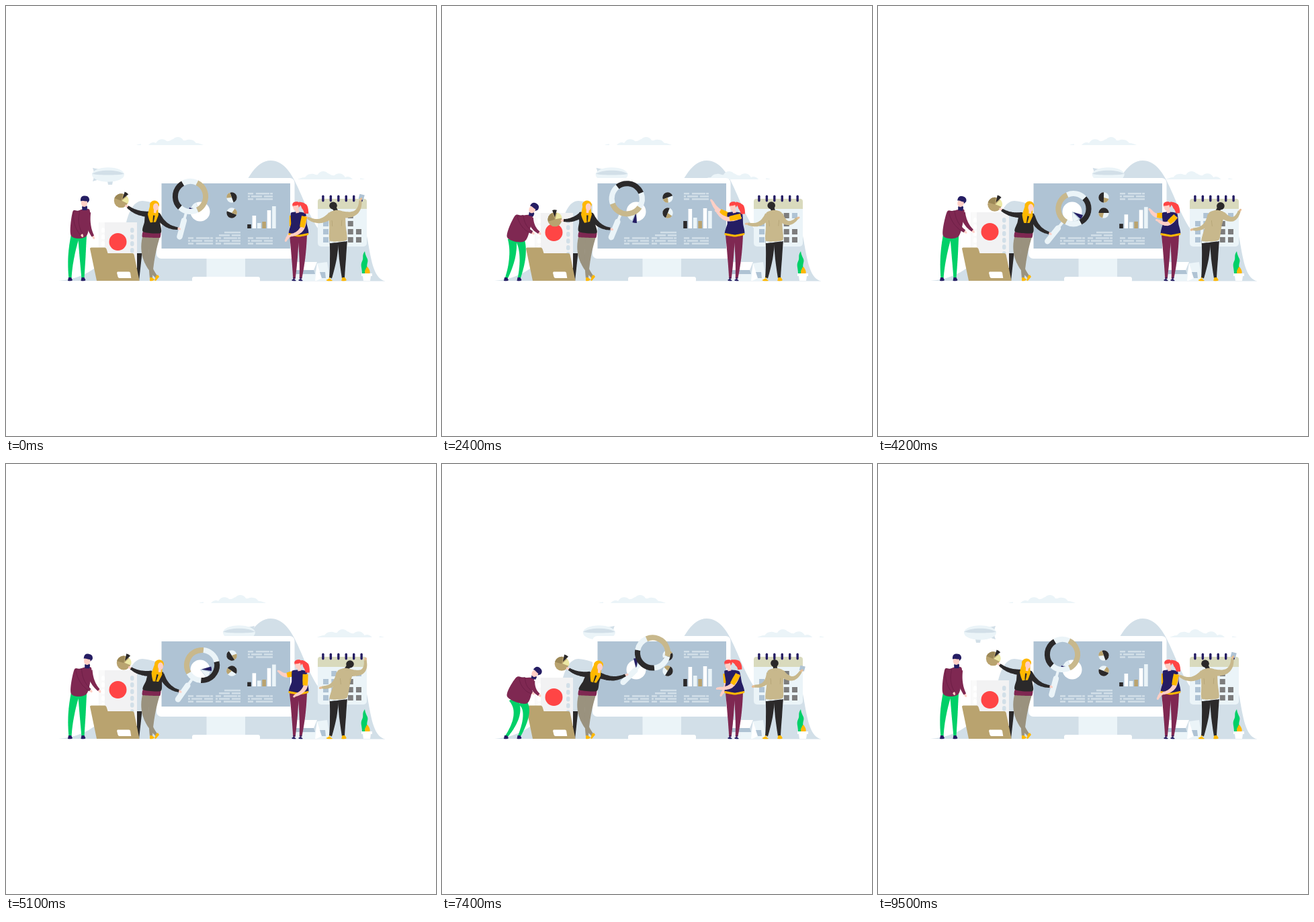
An HTML page with a canvas that plays this animation: 640x640 px, repeating every 9.6 s.

```html
<!DOCTYPE html>
<html lang="en">
<head>
<meta charset="utf-8">
<title>Team at work</title>
<style>
html, body { margin: 0; width: 100%; height: 100%; overflow: hidden; background: #fff; }
canvas { display: block; width: 640px; height: 640px; }
</style>
</head>
<body>
<canvas id="stage" width="640" height="640"></canvas>
<script>
const ctx = document.getElementById("stage").getContext("2d");
const LOOP = 9600, CYCLE = 9500;
const KEYS = [0, 1600, 3300, 5100, 6200, 7400, CYCLE];
const C = {
  hill: "#d2dfe8", pale: "#ebf4f8", screen: "#afc3d4", white: "#fff", dark: "#2b292a",
  navy: "#251d63", wine: "#7f2852", wineDark: "#621c40", green: "#00d068", tan: "#b9a36f",
  sand: "#c8b88c", taupe: "#9a927e", amber: "#ffb800", red: "#ff4545", skin: "#ffcfc5",
  skinTan: "#e6bd95", grey: "#7d7d7d", film: "#f2f2f3", cream: "#ece8a4", header: "#d9dabd"
};
let now = 0;

// Smooth cyclic path through one value per key time.
function track(...v) {
  let i = 0;
  while (i < 5 && now >= KEYS[i + 1]) i++;
  const span = k => KEYS[k + 1] - KEYS[k];
  const slope = k => { k = (k + 6) % 6; return (v[(k + 1) % 6] - v[k]) / span(k); };
  const tangent = k => {
    const a = slope(k - 1), b = slope(k);
    return a * b <= 0 ? 0 : 2 * a * b / (a + b);
  };
  const h = span(i), u = (now - KEYS[i]) / h, w = 1 - u;
  return v[i] * w * w * (1 + 2 * u) + v[(i + 1) % 6] * u * u * (3 - 2 * u)
    + h * u * w * (w * tangent(i) - u * tangent(i + 1));
}
const smooth = u => u * u * (3 - 2 * u);
const rad = d => d * Math.PI / 180;
const shift = (p, x, y) => [p[0] + x, p[1] + y];
const mix = (a, b, k) => [a[0] + (b[0] - a[0]) * k, a[1] + (b[1] - a[1]) * k];
const polar = (p, r, deg) => shift(p, r * Math.cos(rad(deg)), r * Math.sin(rad(deg)));
const heading = (a, b) => Math.atan2(b[1] - a[1], b[0] - a[0]) * 180 / Math.PI;
const elbowOf = (a, b, bend) => polar(mix(a, b, 0.5), bend, heading(a, b) + 90);

function fill(color, build) {
  ctx.beginPath();
  build();
  ctx.fillStyle = color;
  ctx.fill();
}
const rect = (color, x, y, w, h, r = 0) => fill(color, () => ctx.roundRect(x, y, w, h, r));
const oval = (color, x, y, rx, ry = rx, turn = 0) => fill(color, () => ctx.ellipse(x, y, rx, ry, rad(turn), 0, 7));
const path = (color, d) => { ctx.fillStyle = color; ctx.fill(new Path2D(d)); };

// Closed shape through points; k = 0 gives straight sides.
function shape(color, pts, k = 0.12) {
  const n = pts.length, p = i => pts[(i + n) % n];
  fill(color, () => {
    ctx.moveTo(...pts[0]);
    for (let i = 0; i < n; i++) {
      const a = p(i - 1), b = p(i), c = p(i + 1), d = p(i + 2);
      ctx.bezierCurveTo(b[0] + (c[0] - a[0]) * k, b[1] + (c[1] - a[1]) * k,
        c[0] - (d[0] - b[0]) * k, c[1] - (d[1] - b[1]) * k, c[0], c[1]);
    }
  });
}

// Tapered bent limb from a through b to c.
function limb(color, a, b, c, w0, w1, w2, edge) {
  const m = [2 * b[0] - (a[0] + c[0]) / 2, 2 * b[1] - (a[1] + c[1]) / 2];
  const left = [], right = [];
  for (let i = 0; i <= 16; i++) {
    const u = i / 16, q = mix(mix(a, m, u), mix(m, c, u), u);
    const side = heading(mix(a, m, u), mix(m, c, u)) + 90;
    const r = (u < 0.5 ? w0 + (w1 - w0) * 2 * u : w1 + (w2 - w1) * (2 * u - 1)) / 2;
    left.push(polar(q, r, side));
    right.unshift(polar(q, -r, side));
  }
  shape(color, left.concat(right), 0);
  if (edge) {
    ctx.strokeStyle = edge;
    ctx.lineWidth = 0.6;
    ctx.stroke();
  }
}
function arm(sleeve, skin, shoulder, hand, bend, width = 8.5, edge) {
  const elbow = elbowOf(shoulder, hand, bend);
  oval(skin, ...hand, 3.2, 1.7, heading(elbow, hand));
  limb(sleeve, shoulder, elbow, mix(elbow, hand, 0.92), width, 6.5, 4, edge);
}
function wedge(color, c, r, from, to, pull = 0) {
  const [x, y] = polar(c, pull, (from + to) / 2);
  fill(color, () => { ctx.moveTo(x, y); ctx.arc(x, y, r, rad(from), rad(to)); });
}
function placed(x, y, turn, draw, sx = 1) {
  ctx.save();
  ctx.translate(x, y);
  ctx.rotate(rad(turn));
  ctx.scale(sx, 1);
  draw();
  ctx.restore();
}
function shoe(color, x, dir) {
  path(color, `M${x - 2} 404H${x + 2}L${x + 4 * dir} 408Q${x + 3 * dir} 410 ${x - 3 * dir} 409Z`);
}

function cloud(x, base, dir) {
  placed(x, base, 0, () => {
    path(C.pale, "M0 0C3 -4 8 -5 11 -3C15 -10 23 -10 27 -6C32 -5 33 -8 37 -9C42 -14 49 -12 52 -7C56 -6 57 -9 62 -8C67 -8 69 -5 71 -3C76 -3 79 -1 82 0Z");
    path(C.pale, "M-18 0Q-15 -2 -11 -1.5V0Z");
  }, dir);
}
function airship(x, dir) {
  placed(x, 251, 0, () => {
    path(C.hill, "M-23 -10L-13 -8L-16 -4H-21ZM-23 10L-13 7L-17 3L-21 4ZM-1 10H7L6 15H0Z");
    oval(C.pale, 0, 0, 24, 10.8);
    path(C.hill, "M-24 -1C-14 -8 14 -8 24 -1C12 1 -12 1 -24 -1Z");
  }, dir);
}
function lowCloudX() {
  if (now < 2700) return 470.5 + 45.5 * (1 - now / 2700) ** 2;
  if (now < 5900) return 470.5 + 88 * smooth((now - 2700) / 3200);
  return 558.5 - 42.5 * ((now - 5900) / 3600) ** 2;
}
function landscape() {
  path(C.hill, "M78 409C132 406 166 365 179 322C184 302 192 290 203 290C252 293 280 350 300 350C340 340 350 230 394 230C430 231 437 290 465 332L510 300C549 305 531 403 565 409.5Z");
  const drift = smooth(1 - Math.abs(2 * now / CYCLE - 1));
  cloud(212 + 94.5 * drift, 207, 1);
  cloud(lowCloudX(), 258, -1);
  airship(152 + 198 * drift, now < CYCLE / 2 ? 1 : -1);
}

function textBlock(x, y) {
  [[0, 8, 12, 32, 33, 37], [0, 3, 5, 21, 24, 37], [0, 8, 12, 37]].forEach((row, i) => {
    for (let k = 0; k < row.length; k += 2) rect(C.hill, x + row[k], y + i * 4.1, row[k + 1] - row[k], 2.5);
  });
}
function smallPie(y, turn) {
  oval(C.pale, 336, y, 7.7);
  wedge(C.dark, [336, y], 7.7, turn - 90, turn + 90);
  wedge(C.tan, [336, y], 7.7, turn - 165, turn - 90);
}
function monitor(spin) {
  rect(C.pale, 298.5, 375, 57.5, 29);
  rect(C.white, 277, 403, 101, 8, 3);
  rect(C.white, 224, 256, 205.5, 120, 7);
  rect(C.screen, 231.5, 264, 191.5, 97);
  textBlock(360, 278);
  for (const x of [271, 312, 360]) textBlock(x, 344.2);
  rect(C.hill, 325, 335.8, 24, 2.5);
  rect(C.hill, 317, 340, 16, 2.5);
  rect(C.hill, 336, 340, 13, 2.5);

  smallPie(285, -20 - spin);
  smallPie(308, 110 + spin);
  const disc = [289, 306], a = 190 - spin;
  oval(C.white, ...disc, 14.5);
  wedge(C.screen, disc, 14.6, a - 14, a + 55);
  wedge(C.pale, disc, 14, a + 15, a + 55, 1);
  wedge(C.navy, disc, 15, a - 14, a + 12, 2);

  // Bars rise and fall twice per cycle.
  const beat = Math.min(1, 0.67 * (1 - Math.cos(rad(2 * spin))));
  [[C.dark, 6, 5], [C.white, 19, 10], [C.pale, 8, 8], [C.tan, 10, 1], [C.white, 27, 3], [C.pale, 33, -7]]
    .forEach(([color, height, rise], i) => {
      const h = height + rise * beat;
      rect(color, 359.2 + i * 7.38, 331 - h, 5.6, h);
    });
}

function calendar(holding) {
  rect(C.pale, 464, 288, 73, 70, 5);
  rect(C.header, 464, 287, 73, 15, [4, 4, 0, 0]);
  for (let i = 0; i < 6; i++) rect(C.navy, 470.2 + i * 11.45, 281.5, 3.4, 10, 1.7);
  for (let row = 0; row < 4; row++) {
    for (const col of [0, 1, 3, 4]) {
      const note = col === 4 && row === 0;
      if (row + col === 0 || (col === 4 && row === 1) || (note && holding)) continue;
      rect(col < 3 || note ? C.screen : C.grey, 472 + col * 12.25, 308 + row * 12, 8, 8);
    }
  }
}

function boxAndPlant() {
  path(C.white, "M433 381H463L458 393H432Z");
  path(C.screen, "M432 393H458L460 399H432Z");
  path(C.pale, "M430 399H460L463 383L478 381L483 409H430Z");
  path(C.white, "M463 383L470 405L462 409H460Z");
  path(C.screen, "M467 396H475L476 405H470Z");
  path(C.green, "M534 365C529 372 533 374 530 380C527 386 530 390 530 398H538C539 391 536 389 538 382C540 376 535 374 534 365Z");
  path(C.amber, "M538 388C535 390 536 392 534 394V399H541C543 395 540 391 538 388Z");
  path(C.white, "M529 398H545V402H543L542 409H532L531 402H529Z");
}

function filmAndFolder() {
  path(C.dark, "M150 368H202.5L198 409H150Z");
  const top = track(322, 310, 307, 307, 307, 318);
  rect(C.film, 138, top, 57, 390 - top);
  rect("#fafafa", 138.5, top, 8.5, 390 - top);
  for (let y = top + 8; y < top + 60; y += 10) {
    rect(C.white, 142, y, 5, 7.5, 2.5);
    rect(C.hill, 185, y, 5.5, 7.5, 2.7);
  }
  oval(C.red, 166.5, top + 29, 13);
  path(C.tan, "M125 361Q125 359.5 127 359.5H147Q149 359.5 150 363L151.5 368H188Q190 368 190.6 370L198.6 409H135Z");
  path(C.white, "M166 395.5H183Q184.5 395.5 185 397L186.3 405H169Q167 405 166.5 403L165 397Z");
}

function bendingMan() {
  const lean = track(0, 1, 0.5, 0.2, 0.5, 1);
  const crouch = lean ** 3, reach = 1 - (1 - lean) ** 4, lift = Math.sin(Math.PI * lean);
  const neck = [117 + 19 * lean, 302 + 16 * crouch];
  const chest = [125 + 12 * lean, 306 + 16 * crouch];
  const back = [99 + 11 * lean, 307 + 11 * crouch];
  const hipL = [97, 342 + 4 * crouch], hipR = [120 + 7 * crouch, 342 + 14 * crouch];
  limb(C.green, mix(hipL, hipR, 0.27), [97 + 14 * crouch, 374], [95.5, 406], 13, 9, 4);
  limb(C.green, mix(hipL, hipR, 0.72), [114 + 11 * crouch, 373], [114.5, 406], 13, 9, 4);
  shoe(C.navy, 95, 1);
  shoe(C.navy, 114.5, 1);

  arm(C.wine, C.skin, shift(chest, -3, 1), [130 + 15 * reach, 344 - 11 * lift], 3);
  shape(C.wine, [neck, chest, hipR, hipL, back, mix(back, neck, 0.45)], 0.15);
  arm(C.wine, C.skin, mix(back, neck, 0.35), [113 + 22 * reach, 341 - 6 * lift], 4, 9, C.wineDark);

  const head = [117.5 + 25 * lean, 288 + 20 * crouch];
  limb(C.navy, mix(head, neck, 0.6), mix(head, neck, 0.8), shift(neck, 0, 2), 5, 8, 7);
  placed(...head, 38 * lean, () => {
    oval(C.skin, -1, 5, 4.8, 6);
    path(C.navy, "M-6.5 2.5C-7 -4 -4 -5.5 0 -5.5C5 -5.5 7 -2 6.5 1.5L4 5L3 2.5C0 3 -4 1 -6.5 2.5Z");
  });
}

function heldPie(c, a) {
  oval(C.tan, ...c, 10.5);
  wedge("#9c8857", c, 10.5, a - 105, a - 20);
  wedge(C.cream, c, 10.2, a + 16, a + 82, 1);
  wedge(C.dark, c, 11, a - 18, a + 18, 3.5);
}
function magnifier(c, angle, spin) {
  const stroke = (color, width, cap, build) => {
    ctx.strokeStyle = color;
    ctx.lineWidth = width;
    ctx.lineCap = cap;
    ctx.beginPath();
    build();
    ctx.stroke();
  };
  const bar = (from, to) => () => { ctx.moveTo(...polar(c, from, angle)); ctx.lineTo(...polar(c, to, angle)); };
  stroke(C.pale, 4, "butt", bar(25, 36));
  stroke(C.pale, 8.5, "round", bar(37, 62));
  let a = angle + 28 + spin;
  for (const [color, size] of [[C.dark, 107], [C.pale, 56], [C.sand, 127], [C.pale, 70]]) {
    stroke(color, 8, "butt", () => ctx.arc(...c, 22.6, rad(a), rad(a + size)));
    a += size;
  }
}

function blondeWoman(spin) {
  const lens = [track(274.5, 264, 289.5, 291.5, 281.5, 313.5), track(283.5, 273.5, 302.5, 299.5, 273, 281)];
  const angle = track(105, 97, 130, 125, 102, 135);
  const lean = track(0, -8, 0, 7, 2, 12);
  const lowered = track(0, 1, 0.1, 0.1, 1, 0.1);
  magnifier(lens, angle, spin);

  const drop = Math.max(0, lean) * 0.25;
  const head = [222 + lean, 299 + drop];
  const shL = [208 + 0.7 * lean, 307 + drop], shR = [229 + 0.75 * lean, 308.5 + drop];
  const hairEnd = [219 + 0.55 * lean, 322 + drop];
  const handL = [180 + 0.6 * lean + 5 * lowered, 298 + 36 * lowered + drop];
  const armL = shift(shL, 4, 3);

  limb(C.taupe, [210.5, 343], [208.5, 374], [224.5, 404], 14, 10, 4);
  limb(C.taupe, [221.5, 343], [217, 373], [216, 405], 15, 9.5, 4);
  path(C.amber, "M214 404H217L221 407Q219 410 214 409ZM223 402L226 400L228 403L223 409Q220 409 222 406Z");
  shape(C.wine, [[204, 336], [230, 336], [229, 345], [203, 344]], 0.04);

  const tilt = heading(elbowOf(armL, handL, -3), handL) + 13;
  heldPie(polar(handL, 12, tilt), tilt + 82);
  arm(C.dark, C.skin, armL, handL, -3);
  arm(C.dark, C.skin, shift(shR, -3, 3), polar(lens, 51, angle + 5), 5);
  const hipL = [204, 336], hipR = [230, 338];
  shape(C.dark, [shL, mix(shL, shR, 0.5), shR, mix(shR, hipR, 0.5), hipR, hipL, mix(shL, hipL, 0.5)]);

  const hairMid = shift(mix(head, hairEnd, 0.5), -1.5, 0);
  limb(C.amber, shift(head, -1, -5), hairMid, hairEnd, 11, 16, 8);
  oval(C.amber, head[0] - 1, head[1] - 3, 7, 6.5);
  limb(C.dark, mix(head, hairEnd, 0.55), mix(head, hairEnd, 0.8), hairEnd, 2.5, 2, 1);
  limb(C.skin, head, shift(head, 0, 5), shift(head, -0.5, 9), 5, 4, 3.5);
  oval(C.skin, head[0] + 1, head[1], 4, 5.6);
}

function redhead() {
  const lean = track(0, 6, -4, 3, 8, -6);
  const raise = track(0, 1, 0.87, 0.65, 0.78, 0.08);
  const near = [track(423, 410, 408, 430, 445, 411), track(342, 318, 297, 345, 351, 334)];
  const head = [432 + lean, 298];
  const shL = [424 + 0.6 * lean, 308], shR = [446 + 0.55 * lean, 309];
  const tail = [447 + 0.6 * lean, 309 + 0.5 * lean];

  limb(C.wine, [429, 341], [429.5, 374], [429, 406], 14, 9, 3.5);
  limb(C.wine, [441, 341], [441, 374], [438.5, 406], 14, 9, 3.5);
  shoe(C.navy, 429, -1);
  shoe(C.navy, 439, -1);
  const bareArm = (shoulder, hand, bend) => {
    const elbow = elbowOf(shoulder, hand, bend);
    arm(C.skin, C.skin, shoulder, hand, bend, 6);
    limb(C.amber, shoulder, mix(shoulder, elbow, 0.45), mix(shoulder, elbow, 0.85), 8, 8, 7);
  };
  bareArm(shift(shL, 2, 4), [417 - 16 * raise, 348 - 60 * raise], -4);
  const hipL = [421.5, 340], hipR = [449.5, 340];
  shape(C.navy, [shL, shift(mix(shL, shR, 0.5), 0, -2), shR, mix(shR, hipR, 0.5), hipR, hipL, mix(shift(shL, 3, 0), hipL, 0.5)], 0.1);
  shape(C.amber, [[421.5, 338], [436, 340.5], [449.5, 338], [449.5, 341], [436, 343.5], [421, 341]], 0.08);
  bareArm(shift(shR, -2, 4), near, -8);

  limb(C.red, shift(head, 4, -5), shift(mix(head, tail, 0.7), 1.5, -7), tail, 3, 9, 6);
  limb(C.skin, head, shift(head, 1, 5), shift(head, 2, 10), 5, 4.5, 5);
  oval(C.red, head[0], head[1] - 2, 5.8, 4.8);
  oval(C.skin, head[0] - 0.5, head[1] + 1.5, 4.2, 5.2);
  oval(C.red, head[0] - 0.5, head[1] - 3.5, 5, 2.6, -15);
}

function planner(holding) {
  const lean = track(-8, -15, 10, 17, 1, 0);
  const handL = [track(448, 446, 465, 469, 460, 464), track(315, 317, 332, 333, 331, 331)];
  const handR = [track(528, 520, 541, 535, 533, 535), track(288, 311, 318, 291, 300, 308)];
  const head = [495 + lean, 296.5 + Math.abs(lean) * 0.08];
  const shL = [485 + 0.5 * lean, 308], shR = [508 + 0.5 * lean, 307.5];
  const neck = mix(shL, shR, 0.5);

  limb(C.dark, [488.5, 349], [487, 377], [483, 405], 14, 10, 4);
  limb(C.dark, [501, 349], [501, 377], [502, 405], 14, 10, 4);
  shoe(C.amber, 482, -1.4);
  shoe(C.amber, 502.5, 1.1);
  if (holding) placed(handR[0] + 1, handR[1] - 4, 14, () => rect(C.screen, -3.5, -3.5, 7.5, 7.5));
  limb(C.dark, head, mix(head, neck, 0.5), neck, 7, 6, 6);
  arm(C.sand, C.skinTan, shift(shL, 3, 3), handL, -7, 10);
  arm(C.sand, C.skinTan, shift(shR, -3, 3), handR, 10, 10);
  shape(C.pale, [[483, 345], [508, 345], [508, 350], [482, 353]], 0.04);
  const hemL = [481.5, 349], hemR = [507.5, 348];
  shape(C.sand, [shL, shift(neck, 0, -4), shR, mix(shR, hemR, 0.5), hemR, [494, 350.5], hemL, mix(shL, hemL, 0.5)], 0.1);
  for (const [sh, dx] of [[shL, 4], [shR, -4]]) {
    limb("#b1a073", shift(sh, dx, 11), shift(sh, dx * 1.1, 15), shift(sh, dx * 1.2, 20), 0.7, 0.7, 0.7);
  }
  oval(C.dark, ...head, 5.8, 5.6);
}

function draw(ms) {
  now = Math.min(ms % LOOP, CYCLE - 0.01);
  const spin = now / CYCLE * 360;
  const holding = now < 2300 || now > 6800;
  rect(C.white, 0, 0, 640, 640);
  landscape();
  monitor(spin);
  calendar(holding);
  boxAndPlant();
  planner(holding);
  filmAndFolder();
  bendingMan();
  blondeWoman(spin);
  redhead();
}

const begin = performance.now();
function tick() {
  draw(performance.now() - begin);
  requestAnimationFrame(tick);
}
tick();
</script>
</body>
</html>
```
